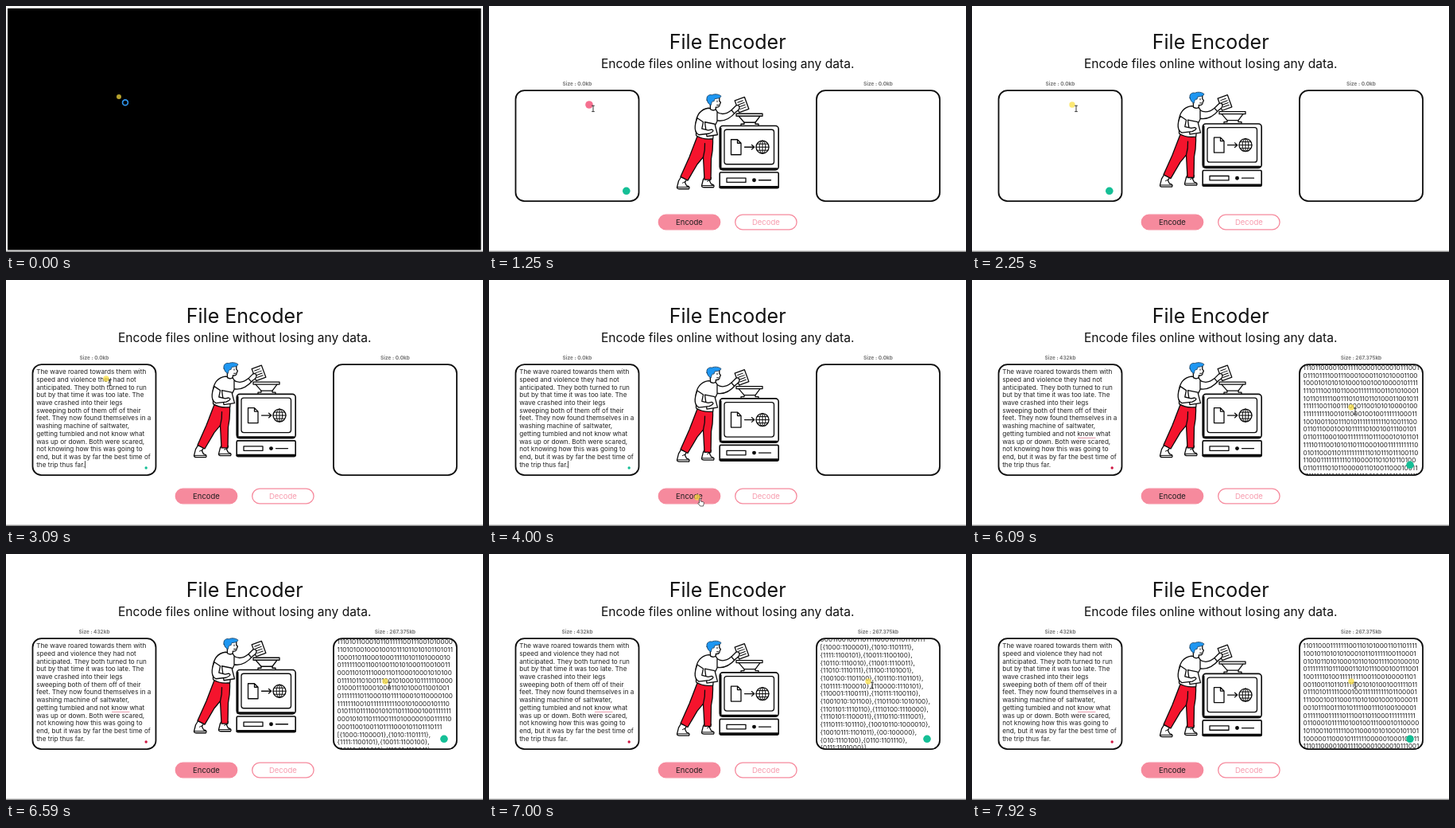
These frames come from a looping animation (600 px wide and 309 px high, 8 s). An HTML page:

```html
<!DOCTYPE html>
<html lang="en">
<head>
<meta charset="utf-8">
<title>File Encoder</title>
<style>
  html, body { margin: 0; width: 100%; height: 100%; overflow: hidden; background: #fff; }
  svg { display: block; width: 600px; height: 309px; font-family: Inter, Roboto, sans-serif; }
  .mid { text-anchor: middle; }
  .size { font-size: 6.45px; font-weight: 700; fill: #777; text-anchor: middle; }
  .body { font-size: 8.16px; fill: #222; }
  .line { fill: none; stroke: #0b0b0b; stroke-linecap: round; stroke-linejoin: round; }
  .solid { fill: #fff; }
</style>
</head>
<body>
<svg viewBox="0 0 600 309">
  <defs>
    <clipPath id="pane"><rect x="412.5" y="107" width="153.5" height="137.5" rx="10"/></clipPath>
    <g id="shoe">
      <path class="solid" d="M5 -15L2 -10L0 -2Q0 0 3 0H15Q17 -3 12 -4L10 -8L12 -12Z"/>
      <path d="M1 -2.2H15M7 -7.5L10 -9" stroke-width="1"/>
    </g>
  </defs>
  <rect width="600" height="309" fill="#fff"/>

  <g id="page">
    <text class="mid" x="300.2" y="53.5" font-size="25" fill="#111">File Encoder</text>
    <text class="mid" x="300.2" y="77.8" font-size="15.6" fill="#111">Encode files online without losing any data.</text>
    <text class="size" id="sizeIn" x="111" y="99.8"></text>
    <text class="size" id="sizeOut" x="489.5" y="99.8"></text>

    <g id="art" class="line" stroke-width="1.3">
      <!-- machine -->
      <path class="solid" d="M311 135.5H344V138.5H341L335 146.5V148.5H339V151H317V148.5H321V146.5L314 138.5H311Z"/>
      <path d="M314 138.5H341M321 146.5H335"/>
      <rect class="solid" x="290.2" y="150.8" width="74" height="55.4" rx="4" stroke-width="1.6"/>
      <path d="M291.3 154V204.8H362" stroke-width="2.4"/>
      <rect class="solid" x="296" y="155.5" width="62.5" height="43.5" rx="3"/>
      <rect class="solid" x="290.2" y="209.3" width="74" height="19.7" rx="1.5" stroke-width="1.6"/>
      <path d="M291 227.7H363" stroke-width="3"/>
      <rect x="299" y="216.3" width="24" height="5.4"/>
      <circle cx="333.5" cy="219" r="1.8" fill="#0b0b0b"/>
      <path d="M339.5 219H354.5"/>
      <path d="M312.5 168H304.5V187H317V172.5L312.5 168V172.5H317"/>
      <path d="M321.5 177.5H333.5M330.5 174.7L333.7 177.5L330.5 180.3"/>
      <g transform="translate(344 177.5)">
        <circle r="8"/>
        <ellipse rx="3.8" ry="8" stroke-width="1"/>
        <path d="M0 -8V8M-8 0H8M-6.5 -4H6.5M-6.5 4H6.5" stroke-width="1"/>
      </g>
      <!-- sheet and raised arm -->
      <g transform="translate(318 124.3) rotate(-20)">
        <rect class="solid" x="-6.5" y="-8" width="13" height="16"/>
        <path d="M-4 -4.5H3M-4 -1.5H4M-4 1.5H4M-4 4.5H4" stroke-width="1"/>
      </g>
      <path class="solid" d="M286 133C293 138 299 136 305 131L310 126C312 124 315 125 314.7 127C316 129 313 132 310.5 133.4C304 141 295 146 286 144Z"/>
      <path d="M305 131L308.5 135.2"/>
      <!-- legs -->
      <use href="#shoe" x="236.5" y="230"/>
      <use href="#shoe" x="267.5" y="228"/>
      <path d="M262 164L281.5 167Q282 181 279.5 192L279 218.3H271L269.5 190L262 199L250 219.4L241 214.6L252 190Z" fill="#f5142d"/>
      <path d="M269.5 190Q272 181 271.5 173"/>
      <!-- torso, left arm and folder -->
      <path class="solid" d="M276 128.5C266 130 261 137 260 148L260.6 163Q269 168.5 281.7 167L283 153L287 145V133L284.5 129.5Z"/>
      <path class="solid" d="M271.5 146L284 148.5L287.5 162L274 164Z"/>
      <path class="solid" d="M262 141C258 151 258.5 159 264 162L277 160.5Q285 157 280 155.4L275.8 156.3L267.8 154.4L269.5 146Z"/>
      <!-- head -->
      <path class="solid" d="M278 118L278.5 130Q282.5 132.5 285.3 130V127.3Q290 128 290.2 124L291.4 121.5L289.8 119.5V115Q283 113 278 118Z"/>
      <path d="M287 119.3V120.6M286.6 124.7H288.6" stroke-width="1"/>
      <path d="M274 118.5C273 113 277 111.2 280.5 112C284 110.3 289.5 111 292 113.5Q291 116.5 284 116.8L283 120Q280.5 119 280 122L279.2 125Q275 123 274 118.5Z" fill="#1e97f2" stroke="#173b5c" stroke-width=".8"/>
    </g>

    <g fill="none" stroke="#0d0d0d" stroke-width="1.8">
      <rect x="33.5" y="106.2" width="155" height="139" rx="11"/>
      <rect x="412" y="106.2" width="155" height="139" rx="11"/>
    </g>
    <g id="story" class="body"></g>
    <path id="flag" d="M133 198.4H155.5" stroke="#e58aa0" stroke-width=".9"/>
    <path id="caret" stroke="#222" stroke-width=".8"/>
    <g clip-path="url(#pane)"><g id="output" class="body"></g></g>
    <circle id="badgeIn"/>
    <circle id="badgeOut" cx="551" cy="232.3" r="4.8" fill="#15bf96"/>

    <g stroke="#f68a9d" stroke-width="1.3">
      <rect x="213.3" y="262.2" width="77.4" height="18.6" rx="9.3" fill="#f68a9d"/>
      <rect x="309.7" y="262.2" width="77.4" height="18.6" rx="9.3" fill="#fff"/>
    </g>
    <g class="mid" font-size="9.5">
      <text x="252" y="275" fill="#1d1d1d">Encode</text>
      <text x="348.4" y="275" fill="#f79bad">Decode</text>
    </g>
  </g>

  <rect id="dark" x="2" y="3" width="595.5" height="303.5"/>
  <rect y="307.6" width="600" height="1.4" fill="#8c8c8c"/>

  <g id="pointer">
    <circle id="spot"/>
    <circle id="busy" cx="8" cy="7.3" r="3.4" fill="none" stroke="#2f93ea" stroke-width="1.7"/>
    <path id="beam" d="M3.2 1.2H6.8M5 1.2V8.6M3.2 8.6H6.8" fill="none" stroke="#222" stroke-width=".9"/>
    <path id="arrow" d="M2 2V11L4.2 9L5.8 12.2L7.2 11.5L5.7 8.5H8.5Z" fill="#fff" stroke="#111" stroke-width=".7"/>
    <path id="hand" d="M2.5 1.5Q3.5 .6 4.2 1.8V5L7.6 5.8Q8.5 6.2 8.3 7.5L7.5 11H3.6L.8 7.4Q1.2 6.3 2.5 7.2Z" fill="#fff" stroke="#222" stroke-width=".7"/>
  </g>
</svg>

<script>
const LOOP = 8000, LEAD = 9.7, FIRST = 118.2, WRAP = 146;
const T = { load: 420, click: 1200, paste: 2600, encode: 4150, result: 4330, focus: 5620 };
const $ = id => document.getElementById(id);

const story = `The wave roared towards them with
speed and violence they had not
anticipated. They both turned to run
but by that time it was too late. The
wave crashed into their legs
sweeping both of them off of their
feet. They now found themselves in a
washing machine of saltwater,
getting tumbled and not know what
was up or down. Both were scared,
not knowing how this was going to
end, but it was by far the best time of
the trip thus far.`.split("\n");

// Huffman code: maps each character to its bits.
function huffman(text) {
  const count = {};
  for (const c of text) count[c] = (count[c] || 0) + 1;
  const nodes = Object.entries(count).map(([char, n]) => ({ char, n }));
  while (nodes.length > 1) {
    nodes.sort((a, b) => a.n - b.n);
    const kids = nodes.splice(0, 2);
    nodes.push({ n: kids[0].n + kids[1].n, kids });
  }
  const codes = {};
  const walk = (node, code) => {
    if (node.kids) node.kids.forEach((kid, bit) => walk(kid, code + bit));
    else codes[node.char] = code;
  };
  walk(nodes[0], "");
  return codes;
}

function encode(text) {
  const codes = huffman(text), book = {};
  for (const c in codes) book[codes[c]] = c.charCodeAt(0).toString(2);
  const entries = Object.entries(book).map(([code, char]) => `{${code}:${char}}`);
  const bits = [...text].map(c => codes[c]).join("");
  return [...bits, ...("[" + entries.join(", ") + "]").split(" ")];
}

function wrap(tokens) {
  const pen = document.createElement("canvas").getContext("2d");
  pen.font = "8.16px Inter, Roboto, sans-serif";
  const lines = [""];
  for (const token of tokens) {
    const line = lines[lines.length - 1] + token;
    if (pen.measureText(line).width > WRAP) lines.push(token);
    else lines[lines.length - 1] = line;
  }
  return lines;
}

function fill(group, lines, x) {
  lines.forEach((line, i) => {
    const el = document.createElementNS("http://www.w3.org/2000/svg", "text");
    el.setAttribute("x", x);
    el.setAttribute("y", FIRST + i * LEAD);
    el.textContent = line;
    group.append(el);
  });
}

const output = wrap(encode(story.join(" ")));
const bookTop = output.findIndex(line => line.includes("[")) * LEAD - 2;
fill($("story"), story, 38.2);
fill($("output"), output, 416.6);

const show = (id, on) => $(id).setAttribute("display", on ? "inline" : "none");
const set = (id, attrs) => {
  for (const k in attrs) $(id).setAttribute(k, attrs[k]);
};
const progress = (t, from, to) => Math.min(1, Math.max(0, (t - from) / (to - from)));
const ease = u => u * u * (3 - 2 * u);
const mix = (a, b, u) => a + (b - a) * u;

const rest = { x: 142, y: 114 }, input = { x: 126, y: 124 };
const button = { x: 262, y: 273 }, result = { x: 477, y: 160 };

function pointerAt(t) {
  const go = (a, b, from, to) => {
    const u = ease(progress(t, from, to));
    return { x: mix(a.x, b.x, u), y: mix(a.y, b.y, u) };
  };
  if (t < 3100) return go(rest, input, T.load, 1050);
  if (t < 4760) return go(input, button, 3100, 3800);
  return go(button, result, 4760, 5480);
}

function scrollAt(t) {
  const peek = 13.5 * LEAD;
  const down = peek * progress(t, 5750, 6090) + (bookTop - peek) * progress(t, 6090, 6800);
  return down - bookTop * progress(t, 7250, 7780);
}

const within = (p, l, t, r, b) => p.x > l && p.x < r && p.y > t && p.y < b;

function drawPointer(t) {
  const p = pointerAt(t);
  const pressed = [T.click, T.encode, T.focus].some(c => t >= c && t < c + 170);
  const busy = t < T.load;
  const beam = !busy && (within(p, 30, 103, 186, 242) || within(p, 409, 103, 564, 242));
  const hand = !busy && within(p, 213, 260, 291, 281);
  set("pointer", { transform: `translate(${p.x} ${p.y})` });
  set("spot", {
    r: pressed ? 4.8 : busy ? 3 : 3.7,
    fill: pressed ? "#f4688a" : "#fbdf3f",
    "fill-opacity": pressed ? 0.95 : 0.72
  });
  show("busy", busy);
  show("beam", beam);
  show("hand", hand);
  show("arrow", !busy && !beam && !hand);
}

function drawCaret(t) {
  const pasted = t >= T.paste;
  const since = t - (pasted ? T.paste : T.click + 100);
  const x = 38.6 + (pasted ? $("story").lastChild.getComputedTextLength() : 0);
  const y = FIRST + (pasted ? (story.length - 1) * LEAD : 0);
  set("caret", { d: `M${x} ${y - 7.4}V${y + 1.8}` });
  show("caret", since >= 0 && t < T.encode && since % 1060 < 530);
}

function draw(t) {
  const done = t >= T.result, pasted = t >= T.paste;
  show("dark", t < T.load);
  show("page", t >= T.load);

  const lift = 4 * Math.cos(2 * Math.PI * (t - 1570) / 3000) - 3.4;
  set("art", { transform: `translate(0 ${lift})` });

  $("sizeIn").textContent = done ? "Size : 432kb" : "Size : 0.0kb";
  $("sizeOut").textContent = done ? "Size : 267.375kb" : "Size : 0.0kb";
  show("story", pasted);
  show("output", done);
  show("flag", done);
  show("badgeOut", t >= T.focus);
  set("badgeIn", pasted
    ? { cx: 176.2, cy: 236, r: 1.7, fill: done ? "#cf1742" : "#15bf96" }
    : { cx: 172.8, cy: 232.3, r: 4.8, fill: "#15bf96" });
  set("output", { transform: `translate(0 ${-scrollAt(t)})` });

  drawCaret(t);
  drawPointer(t);
}

const start = performance.now();
function tick() {
  draw((performance.now() - start) % LOOP);
  requestAnimationFrame(tick);
}
tick();
</script>
</body>
</html>
```
